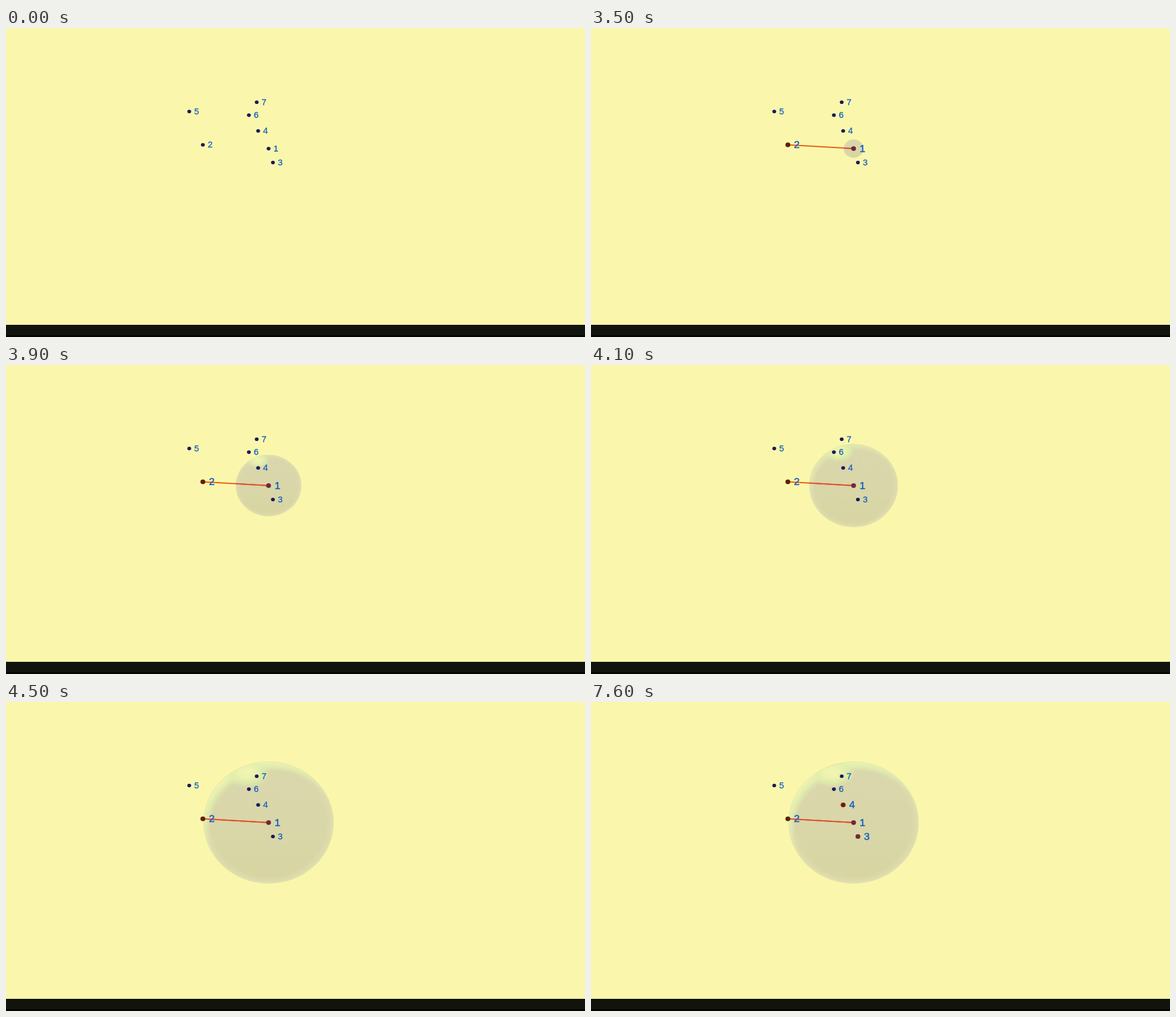
An HTML page for the animation above (8 s loop, 1000 px wide and 533 px high).

```html
<!DOCTYPE html>
<html lang="en">
<head>
<meta charset="utf-8">
<title>Points and sphere</title>
<style>
  html, body { margin: 0; width: 100%; height: 100%; overflow: hidden; background: #faf7ac; }
  svg { display: block; width: 100%; height: 100%; }
  text { font-family: "Liberation Sans", Arial, sans-serif; fill: #1560bc; stroke: #1560bc; }
</style>
</head>
<body>
<svg viewBox="0 0 1000 533" preserveAspectRatio="none">
  <defs>
    <linearGradient id="body" x1="0" y1="0" x2="0" y2="1">
      <stop offset="0" stop-color="#dad7ae"/>
      <stop offset=".5" stop-color="#d9d6a9"/>
      <stop offset="1" stop-color="#d8d5a2"/>
    </linearGradient>
    <radialGradient id="edge">
      <stop offset=".88" stop-color="#dedbae" stop-opacity="0"/>
      <stop offset=".96" stop-color="#dedbae" stop-opacity=".8"/>
      <stop offset="1" stop-color="#e6e3ae"/>
    </radialGradient>
    <radialGradient id="rim" gradientUnits="userSpaceOnUse" cx=".08" cy=".14" r="1.16">
      <stop offset=".84" stop-color="#e0eeac" stop-opacity="0"/>
      <stop offset=".92" stop-color="#e4f0ae" stop-opacity=".85"/>
      <stop offset="1" stop-color="#f3f5b0"/>
    </radialGradient>
    <radialGradient id="shine">
      <stop offset="0" stop-color="#f5f3b2"/>
      <stop offset=".35" stop-color="#ecf3ae"/>
      <stop offset=".65" stop-color="#e0f0aa" stop-opacity=".8"/>
      <stop offset="1" stop-color="#dcefa6" stop-opacity="0"/>
    </radialGradient>
    <clipPath id="ball"><circle r="1"/></clipPath>
    <clipPath id="inside"><ellipse id="cut" cx="453.5" cy="208"/></clipPath>
  </defs>
  <rect width="1000" height="533" fill="#faf7ac"/>
  <rect y="512" width="1000" height="21" fill="#11140c"/>
  <rect y="530" width="1000" height="3" fill="#040404"/>
  <g id="sphere">
    <g clip-path="url(#ball)">
      <circle r="1" fill="url(#body)"/>
      <circle r="1" fill="url(#edge)"/>
      <circle id="glow" r="1" fill="url(#rim)"/>
      <ellipse id="spot" cx="-.33" cy="-.82" rx=".36" ry=".25" fill="url(#shine)"/>
    </g>
    <circle r=".996" fill="none" stroke="#e2e1a8" stroke-width=".007"/>
  </g>
  <g id="radius" stroke-width="2">
    <path d="M340 201.5L453.5 208" stroke="#ee5606"/>
    <path d="M340 201.5L453.5 208" stroke="#e04e36" clip-path="url(#inside)"/>
  </g>
  <g id="points"></g>
</svg>
<script>
const LOOP = 8000, STEP = 100;
const GROW = 3500, FULL = 112.5;
const ASPECT = 1.07;   // the scene is wider than it is high
const CENTER = { x: 453.5, y: 208 };
const NAVY = '#1b1a5a';

// x, y, time of selection, colour when selected
const DATA = [
  [453.5, 208, 1500, '#6c1c10'],
  [340, 201.5, 3500, '#5e2208'],
  [461, 232, 5500, '#702a38'],
  [435.5, 177.5, 7500, '#6c2006'],
  [316.5, 144, Infinity],
  [419.5, 150.3, Infinity],
  [433, 128, Infinity]
];

const $ = id => document.getElementById(id);
const clamp = v => Math.max(0, Math.min(1, v));

function set(el, attrs) {
  for (const key in attrs) el.setAttribute(key, attrs[key]);
}

function add(parent, tag, attrs = {}) {
  const el = document.createElementNS('http://www.w3.org/2000/svg', tag);
  set(el, attrs);
  return parent.appendChild(el);
}

const points = DATA.map(([x, y, at, color], i) => {
  const g = add($('points'), 'g', { transform: `translate(${x} ${y}) scale(${ASPECT} 1)` });
  const dot = add(g, 'circle');
  const label = add(g, 'text');
  label.textContent = i + 1;
  return { dot, label, at, color };
});

function drawPoint({ dot, label, at, color }, t) {
  const on = t >= at;
  set(dot, { r: on ? 3.9 : 3.1, fill: on ? color : NAVY });
  set(label, {
    x: on ? 9.8 : 8,
    y: on ? 5.7 : 4.7,
    'font-size': on ? 16.5 : 14,
    'stroke-width': on ? .5 : .3
  });
}

function drawSphere(t) {
  const show = t >= GROW;
  const rx = Math.min(FULL, 17.2 + (t - GROW) * .0992);
  const ry = rx / ASPECT;
  $('sphere').style.display = $('radius').style.display = show ? '' : 'none';
  if (!show) return;
  set($('sphere'), { transform: `translate(${CENTER.x} ${CENTER.y}) scale(${rx} ${ry})` });
  set($('cut'), { rx, ry });
  set($('glow'), { opacity: clamp((rx - 55) / 45) });
  set($('spot'), { opacity: clamp((rx - 20) / 40) });
  set(points[0].dot, { fill: '#6c2a3a' });
}

function draw(now) {
  const t = Math.floor(now % LOOP / STEP) * STEP;
  points.forEach(p => drawPoint(p, t));
  drawSphere(t);
}

const start = performance.now();
function tick() {
  draw(performance.now() - start);
  requestAnimationFrame(tick);
}
tick();
</script>
</body>
</html>
```
